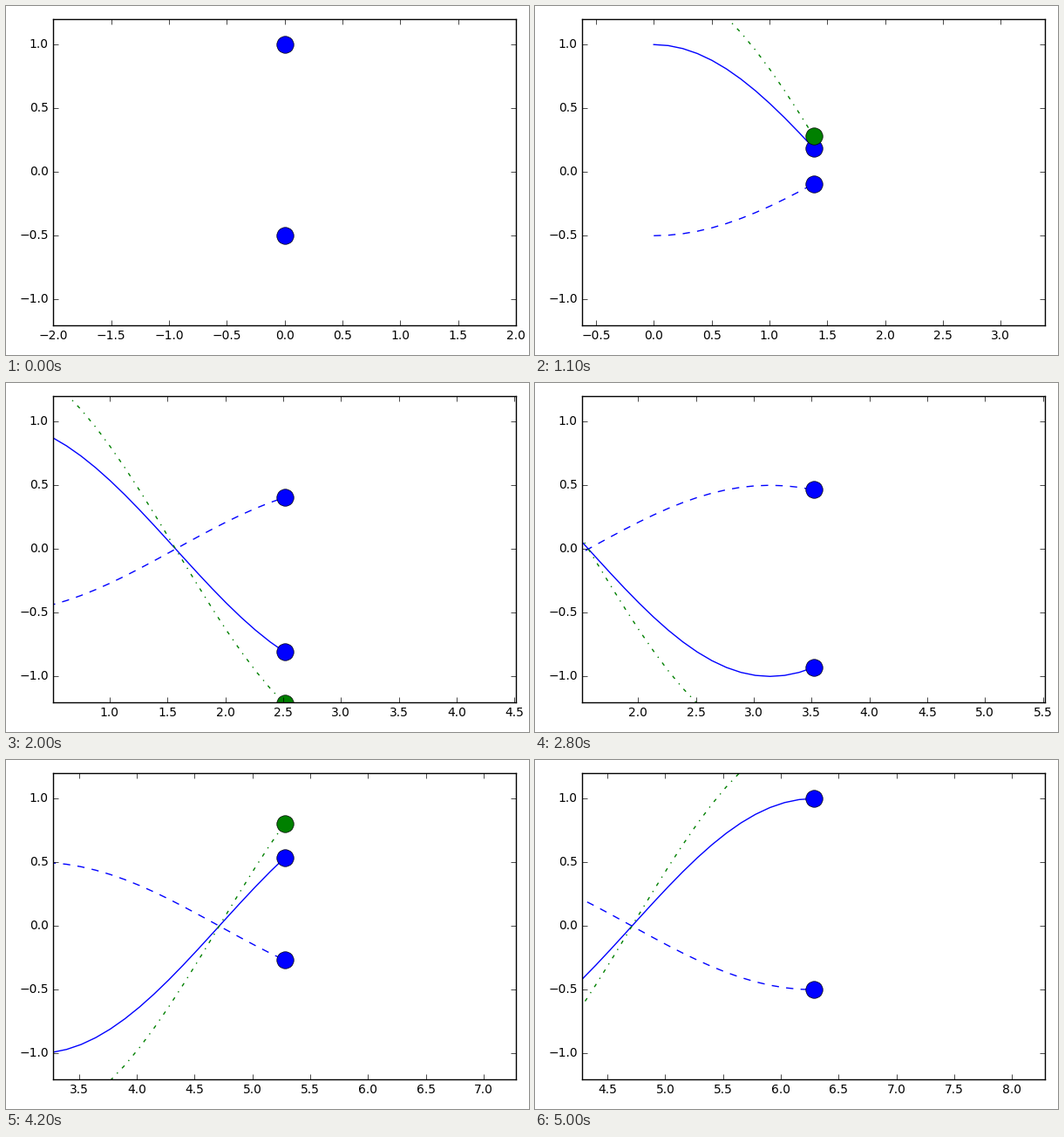
These frames come from a looping animation (600 px wide and 400 px high, 5.1 s). A matplotlib script:

```python
import numpy as np
import matplotlib.pyplot as plt
from matplotlib.animation import FuncAnimation

plt.style.use("classic")
plt.rcParams.update({
    "font.family": "DejaVu Sans",
    "font.size": 10,
    "figure.facecolor": "white",
    "savefig.facecolor": "white",
    "savefig.dpi": 100,
})

FRAMES = 51
HALF_WIDTH = 2
WAVES = [(1.0, "b", "-"), (-0.5, "b", "--"), (1.5, "g", "-.")]

phase = np.linspace(0, 2 * np.pi, FRAMES)

fig = plt.figure(figsize=(6, 4), dpi=100)
ax = fig.add_axes([54.3 / 600, 34.5 / 400, 530.7 / 600, 350.5 / 400])
ax.set_ylim(-1.2, 1.2)
ax.set_autoscale_on(False)

trails = [ax.plot([], [], color + style)[0] for _, color, style in WAVES]
balls = [ax.plot([], [], color + "o", markersize=14)[0] for _, color, _ in WAVES]


def draw(frame):
    x = phase[:frame + 1]
    for (amplitude, _, _), trail, ball in zip(WAVES, trails, balls):
        y = amplitude * np.cos(x)
        trail.set_data(x, y)
        ball.set_data(x[-1:], y[-1:])
    ax.set_xlim(x[-1] - HALF_WIDTH, x[-1] + HALF_WIDTH)
    return trails + balls


anim = FuncAnimation(fig, draw, frames=FRAMES, init_func=lambda: draw(0),
                     interval=100, repeat=True, repeat_delay=0, blit=False)

plt.show()
```
